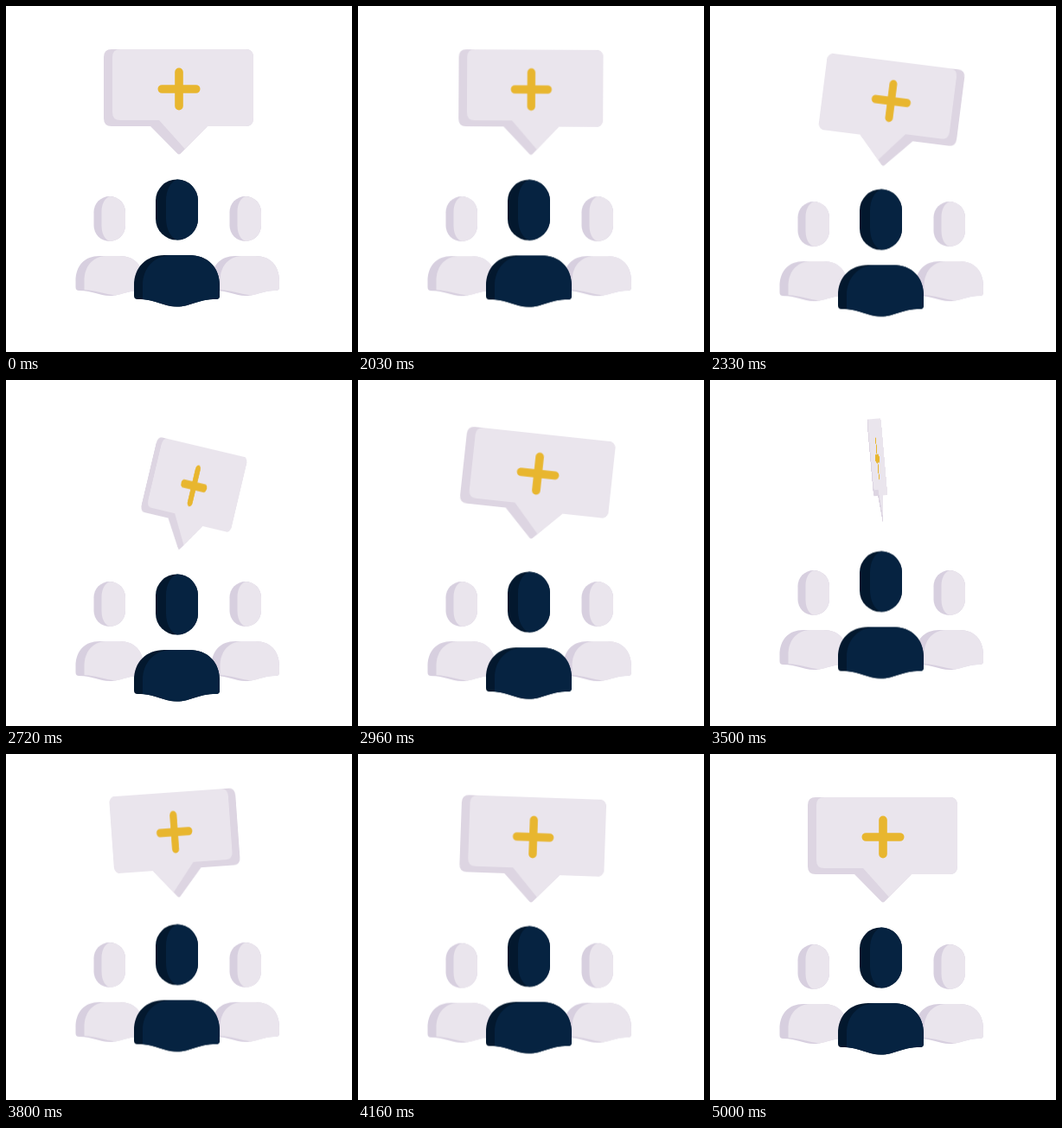
These frames come from a looping animation (400 by 400 pixels, 5120 ms). An HTML page without scripts:

```html
<!DOCTYPE html>
<html lang="en">
<head>
<meta charset="utf-8">
<title>Community support</title>
<style>
html, body { margin: 0; width: 100%; height: 100%; overflow: hidden; background: #fff; }
.stage { position: relative; width: 400px; height: 400px; overflow: hidden; }
.stage svg, .hop { position: absolute; left: 0; top: 0; width: 400px; height: 400px; }
.light { fill: #eae5ed; }
.shade { fill: #d7cfdf; }
.edge { fill: #ddd5e2; }
.navy { fill: #062341; }
.deep { fill: #03182e; }
.plus { stroke: #e8b62f; stroke-width: 9.6; stroke-linecap: round; }

.hop, .spin, .lead, .sides { animation: 5120ms linear infinite; }
.hop, .spin { transform-origin: 200px 171px; }
.hop { animation-name: hop; }
.spin { animation-name: spin; }
.lead { animation-name: lead; }
.sides { animation-name: sides; }

/* the bubble tips over its point, then springs back */
@keyframes hop {
  0%, 39.06% { transform: translateY(0) rotate(0deg); animation-timing-function: cubic-bezier(.4, .15, .6, 1); }
  52.34% { transform: translateY(24.7px) rotate(13.5deg); animation-timing-function: cubic-bezier(.45, 0, .7, .8); }
  60.16% { transform: translateY(4.8px) rotate(2.1deg); }
  62.5% { transform: translateY(1.5px) rotate(.8deg); animation-timing-function: cubic-bezier(.3, .3, .7, .8); }
  68.36% { transform: translateY(-5.5px) rotate(-5deg); animation-timing-function: ease-out; }
  70.8% { transform: translateY(-7.4px) rotate(-5.6deg); animation-timing-function: cubic-bezier(.4, 0, .65, .9); }
  81.25% { transform: translateY(0) rotate(2deg); animation-timing-function: ease-out; }
  86.33% { transform: translateY(0) rotate(3.4deg); animation-timing-function: cubic-bezier(.45, 0, .7, .7); }
  92.38% { transform: translateY(0) rotate(1.9deg); animation-timing-function: ease-out; }
  97.66%, 100% { transform: translateY(0) rotate(0deg); }
}
/* two turns about the upright axis */
@keyframes spin {
  0%, 39.06% { transform: rotateY(0deg); animation-timing-function: cubic-bezier(.38, .54, .7, 1); }
  59.57% { transform: rotateY(360deg); animation-timing-function: cubic-bezier(.5, .2, .8, .8); }
  62.5% { transform: rotateY(380.5deg); animation-timing-function: cubic-bezier(.4, .3, .7, .65); }
  68.36% { transform: rotateY(444.3deg); animation-timing-function: cubic-bezier(.3, .2, .65, .86); }
  81.25% { transform: rotateY(705deg); animation-timing-function: ease-out; }
  85%, 100% { transform: rotateY(720deg); }
}
@keyframes lead {
  0%, 39.06% { transform: translateY(0); animation-timing-function: cubic-bezier(.4, .1, .6, 1); }
  53.13% { transform: translateY(24px); animation-timing-function: cubic-bezier(.45, 0, .7, .6); }
  60.74% { transform: translateY(17.5px); }
  62.5% { transform: translateY(11.5px); animation-timing-function: cubic-bezier(.3, .35, .6, .9); }
  68.36% { transform: translateY(-2.5px); animation-timing-function: ease-out; }
  71.3% { transform: translateY(-4px); animation-timing-function: ease-in-out; }
  81.25% { transform: translateY(-1.5px); animation-timing-function: ease-out; }
  91.8%, 100% { transform: translateY(0); }
}
@keyframes sides {
  0%, 39.06% { transform: translateY(0); animation-timing-function: cubic-bezier(.4, .1, .6, 1); }
  53.13% { transform: translateY(13px); animation-timing-function: ease-out; }
  55.66% { transform: translateY(13.5px); animation-timing-function: ease-in; }
  62.5% { transform: translateY(10.7px); animation-timing-function: cubic-bezier(.3, .3, .6, .9); }
  68.36% { transform: translateY(0); animation-timing-function: ease-out; }
  71.3% { transform: translateY(-2.4px); animation-timing-function: ease-in-out; }
  81.25% { transform: translateY(-1.4px); animation-timing-function: ease-out; }
  91.8%, 100% { transform: translateY(0); }
}
</style>
</head>
<body>
<div class="stage">
  <svg viewBox="0 0 400 400">
    <defs>
      <g id="person">
        <rect class="shade" x="101.5" y="220" width="36.5" height="52" rx="18.2"/>
        <path class="light" d="M120 220A18.2 18.2 0 0 1 138 238.2V253.8A18.2 18.2 0 0 1 120 272C114 270 110.5 263 110.5 253.8V238.2C110.5 229 114 222 120 220Z"/>
        <path class="shade" d="M80.5 325V318C80.5 300 91 289 108 289H131.500C148.500 289 159 300 159 318V325Q159 329 155 329C138 329 133 335 120 335S101 329 84.500 329Q80.500 329 80.500 325Z"/>
        <path class="light" d="M115 289H131.500C148.500 289 159 300 159 318V325Q159 329 155 329C141 329 136 333.500 126 334.500C114 333 104 329 90.500 328V318C90.500 301 100 290 115 289Z"/>
      </g>
    </defs>
    <g class="sides">
      <use href="#person"/>
      <use href="#person" x="157"/>
    </g>
    <g class="lead">
      <rect class="deep" x="173" y="200.500" width="49" height="70" rx="24.500"/>
      <path class="navy" d="M198 200.500A24.500 24.500 0 0 1 222 225V246A24.500 24.500 0 0 1 198 270.500C190 268 185 257 185 246V225C185 213 190 203 198 200.500Z"/>
      <path class="deep" d="M148 335V323C148 302 162 288 183 288H212C233 288 247 302 247 323V335Q247 339 243 339C221 339 214 347.500 197.500 347.500S174 339 152 339Q148 339 148 335Z"/>
      <path class="navy" d="M190 288H212C233 288 247 302 247 323V335Q247 339 243 339C221 339 214 347.500 197.500 347.500C181 347 174 340 158 339V323C158 303 171 289 190 288Z"/>
    </g>
  </svg>
  <div class="hop">
    <svg class="spin" viewBox="0 0 400 400">
      <path class="edge" d="M122 50H277Q286 50 286 59V130Q286 139 277 139H233L202 170.500Q200 172.300 198 170.500L167 139H122Q113 139 113 130V59Q113 50 122 50Z"/>
      <path class="light" d="M132 50H277Q286 50 286 59V130Q286 139 277 139H233L207 165.400L177 132H132Q123 132 123 123V59Q123 50 132 50Z"/>
      <path class="plus" d="M180.300 96H219.700M200 76.300V115.700"/>
    </svg>
  </div>
</div>
</body>
</html>
```
